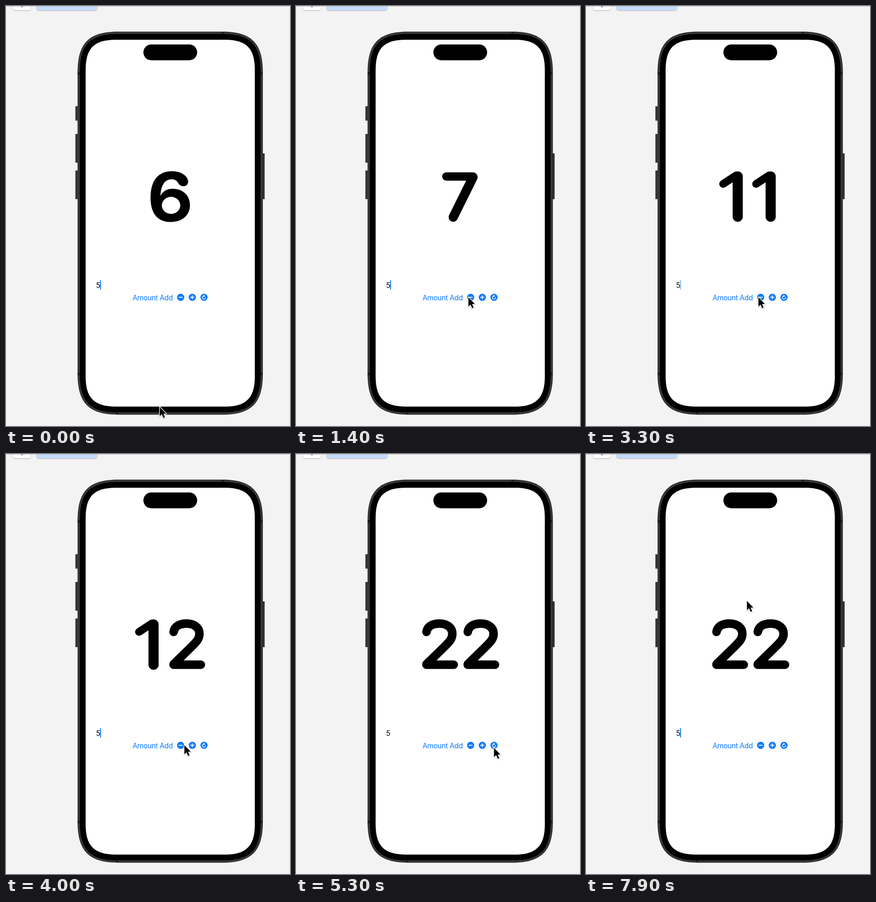
Recreate the animation shown at these times as an HTML page. Size 616x909 px, loop 8 s.

```html
<!DOCTYPE html>
<html lang="en">
<head>
<meta charset="utf-8">
<title>Counter</title>
<style>
  html, body { margin: 0; height: 100%; overflow: hidden; background: #f3f3f3; }
  svg { display: block; width: 100vw; height: 100vh; }
  text { font: 15.5px Inter, "Noto Sans", sans-serif; letter-spacing: -.37px; fill: #0a7aff; }
  .line { fill: none; stroke: #000; stroke-linecap: round; stroke-linejoin: round; }
  .icon path { fill: none; stroke: #fff; stroke-width: 1.8; stroke-linecap: round; stroke-linejoin: round; }
  .icon circle { fill: #0a7aff; }
</style>
</head>
<body>
<svg viewBox="0 0 616 909">
  <defs>
    <filter id="soft" x="-50%" y="-50%" width="200%" height="200%">
      <feDropShadow dx="0" dy="1" stdDeviation="1.2" flood-opacity=".3"/>
    </filter>
    <!-- Rounded digits, each centred on x = 0 -->
    <g id="d1" class="line">
      <path d="M-23.2 385L4.3 367" stroke-width="17"/>
      <path d="M8.3 369V456" stroke-width="22"/>
    </g>
    <path id="d2" class="line" stroke-width="18.6"
      d="M-28.7 385C-26.7 373 -15.7 367 -.7 367C16.3 367 27.3 376 27.3 389C27.3 400 21.3 406 10.3 417L-28.7 455V456H30.3"/>
    <path id="d6" fill-rule="evenodd"
      d="M-43 415C-43 378 -26.5 357.5 3.5 357.5C24.5 357.5 38.5 369 38.5 380C38.5 386 34.5 390 28.5 390C23.5 390 20.5 388 17.5 384C14.5 378 9.5 375 2.5 375C-12.5 375 -20.5 389 -21.5 411C-16.5 401 -7.5 395.5 4.5 395.5C27.5 395.5 42.5 410 42.5 431C42.5 453 25.5 467.5 .5 467.5C-27.5 467.5 -43 449 -43 415ZM-18.5 431.5a20 18.5 0 1 0 40 0a20 18.5 0 1 0 -40 0Z"/>
    <g id="d7" class="line">
      <path d="M-30.5 369H27.5" stroke-width="18"/>
      <path d="M27.5 370.5L-15.5 457" stroke-width="20"/>
    </g>
  </defs>

  <g filter="url(#soft)">
    <rect x="15" y="-20" width="39" height="29" rx="5" fill="#fff"/>
    <rect x="66" y="-20" width="132" height="29" rx="5" fill="#c3dbfd"/>
  </g>
  <path d="M34.5 0V2.5" stroke="#111" stroke-width="2"/>
  <path d="M0 .5H616" stroke="#bcbcbc"/>

  <path d="M153 217V248M153 277V339M153 356V418M558.5 319V418" stroke="#333" stroke-width="5"/>
  <g id="phone"></g>
  <path d="M155.5 146H160M552 146H557M155.5 796H160M552 796H557M470 56V60.5M241 880V884" stroke="#202020" stroke-width="6"/>
  <rect x="298" y="83.2" width="116.6" height="34.2" rx="17.1"/>

  <g id="number" transform="translate(356.5 0)"></g>
  <text x="195.5" y="609.5" style="fill:#000">5</text>
  <rect id="caret" x="204" y="593.5" width="2" height="20" fill="#0a7aff"/>
  <text id="add" x="274.5" y="636.5">Amount Add</text>
  <g class="icon" id="minus" transform="translate(378.8 630.5)"><circle r="7.8"/><path d="M-3.5 0h7"/></g>
  <g class="icon" id="plus" transform="translate(404.1 630.5)"><circle r="7.8"/><path d="M-3.5 0h7M0 -3.5v7"/></g>
  <g class="icon" transform="translate(429.5 630.5)"><circle r="7.8"/>
    <path style="stroke-width:1.3" d="M3.4 -.3a3.5 3.5 0 1 1 -3.2 -2.7M-.8 -4.9l2 1.9l-2 1.9"/></g>

  <path id="cursor" filter="url(#soft)" stroke="#fff" stroke-width="2.6" paint-order="stroke" stroke-linejoin="round"
    d="M0 0V20L4.6 15.8L8 23.6L11.3 22.2L8 14.6H14Z"/>
</svg>
<script>
const $ = id => document.getElementById(id);
const clamp = v => Math.max(0, Math.min(1, v));

// Rectangle with continuous-curvature corners, inset d from the phone's edge
function squircle(d, r, fill) {
  const x = 155.3 + d, y = 55.6 + d, R = 557.1 - d, B = 884.4 - d, e = 1.28 * r, c = .355 * r;
  return `<path fill="${fill}" d="M${x} ${y + e}C${x} ${y + c} ${x + c} ${y} ${x + e} ${y}` +
    `H${R - e}C${R - c} ${y} ${R} ${y + c} ${R} ${y + e}` +
    `V${B - e}C${R} ${B - c} ${R - c} ${B} ${R - e} ${B}` +
    `H${x + e}C${x + c} ${B} ${x} ${B - c} ${x} ${B - e}Z"/>`;
}
$('phone').innerHTML = squircle(0, 69, '#242424') + squircle(1.3, 68, '#3a3a3a') +
  squircle(4.8, 64, '#000') + squircle(17.4, 51.5, '#fff');

const spots = {
  start: [333.5, 868], plus: [404, 632], minus: [374, 630.5], word: [350, 629],
  add: [338, 624], reset: [429.5, 636], out: [428, 1100], below: [348, 1100], top: [349, 318]
};
// What each button adds to the count
const effect = { plus: 1, minus: -1, add: 5 };
const advance = { 1: 71.5, 2: 89.5, 6: 90, 7: 83 };

// Pointer arrivals: [time, spot, clicked]
const steps = [
  [0, 'start'], [1000, 'plus', 1], [1400, 'minus'], [1800, 'minus', 1],
  [2300, 'word'], [2400, 'add', 1], [2700, 'plus'], [3300, 'minus'], [3600, 'plus'],
  [3800, 'plus', 1], [4200, 'add', 1], [4500, 'add', 1], [5000, 'reset'],
  [6800, 'out'], [7500, 'below'], [7900, 'top']
];

// Rest at a spot, then glide so as to arrive at the next one on time
function pointer(t) {
  const i = steps.findLastIndex(s => s[0] <= t);
  const [from, a] = steps[i], [to, b] = steps[i + 1] ?? steps[i];
  const p = clamp(1 - (to - t) / Math.min(300, to - from || 1));
  const ease = p * p * (3 - 2 * p);
  return spots[a].map((v, n) => v + (spots[b][n] - v) * ease);
}

function digits(count) {
  const list = [...String(count)];
  let x = -list.reduce((sum, d) => sum + advance[d], 0) / 2;
  return list.map(d => {
    const mid = x + advance[d] / 2;
    x += advance[d];
    return `<use href="#d${d}" x="${mid}"/>`;
  }).join('');
}

let shown;
function draw() {
  const t = Math.floor(performance.now() % 8000 / 100) * 100;
  $('cursor').setAttribute('transform', `translate(${pointer(t)})`);

  const clicks = steps.filter(s => s[2] && s[0] <= t);
  const count = clicks.reduce((sum, s) => sum + effect[s[1]], 6);
  if (count !== shown) $('number').innerHTML = digits(shown = count);

  // A pressed button fades back in
  for (const id in effect) {
    const last = clicks.findLast(s => s[1] === id)?.[0] ?? -1000;
    $(id).setAttribute('opacity', .22 + .78 * clamp((t - last) / 200));
  }

  const blink = Math.max(1, Math.round(t / 1050)) * 1050;
  $('caret').setAttribute('opacity', clamp(Math.abs(t - blink) / 100 - 1));
  requestAnimationFrame(draw);
}
draw();
</script>
</body>
</html>
```
